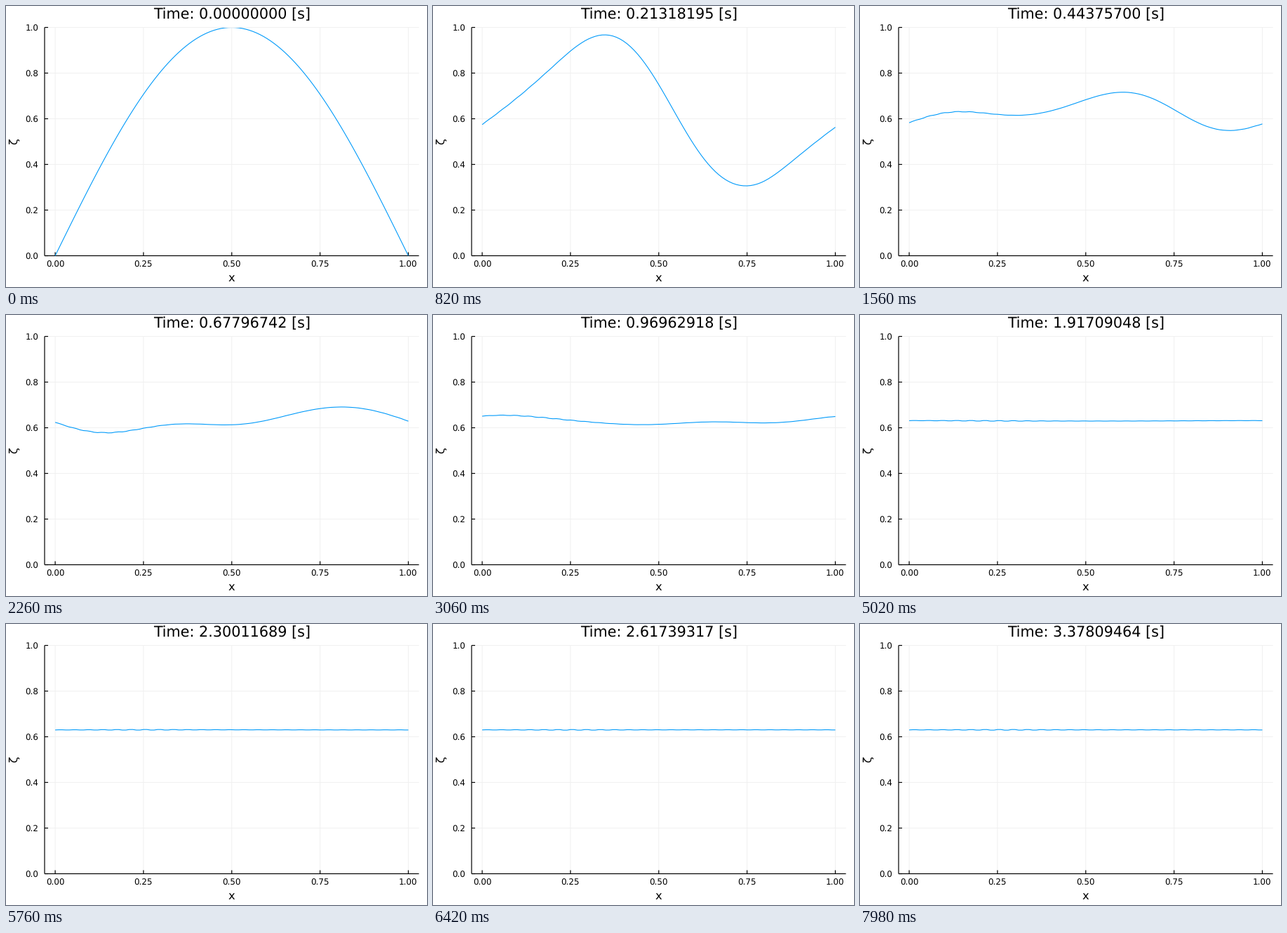
A matplotlib script for the animation above (8000 ms loop, 600 px wide and 400 px high).

```python
import numpy as np
import matplotlib.pyplot as plt
from matplotlib.animation import FuncAnimation
from matplotlib.patches import Rectangle

W, H, DPI = 600, 400, 100
PX = 72 / DPI                                # points per pixel
LEFT, RIGHT, TOP, BOTTOM = 55, 588.5, 30.5, 355.5

plt.rcParams.update({"font.family": "DejaVu Sans", "text.hinting": "none",
                     "text.kerning_factor": 6, "toolbar": "None"})

# Clock: solver steps are unequal, so time is a smooth curve through a few points
STEPS = np.array([0, 34, 65, 89, 124, 137, 171])
TIMES = np.array([0, 0.44375700, 0.96962918, 1.52212253,
                  2.30011689, 2.61739317, 3.37809464])
SLOPES = np.gradient(TIMES, STEPS)


def polar(size, degrees):
    return size * np.exp(1j * np.radians(degrees))


# Periodic grid: a half sine split into right- and left-going damped waves.
# The first modes have their own share, speed and damping rate * t ** power.
N = 101
x = np.linspace(0, 1, N)
modes = np.fft.rfft(np.sin(np.pi * x))
k = np.arange(len(modes))

right = np.full(len(k), 0.1, complex)
right[1:4] = polar(0.708, 150), polar(1, 23), polar(0.09, -17)
right_speed = np.ones(len(k))
right_speed[1:4] = 1, 0.911, 1.19
right_rate = 3.0 + k
right_rate[:4] = 0, 3, 2.47, 0.35
right_power = np.ones(len(k))
right_power[2:4] = 1.53, 4

left = 1 - right
left_speed = np.ones(len(k))
left_speed[1] = 1.11
left_rate = 10.0 + k
left_rate[:3] = 0, 7.4, 10


def px(v):
    return LEFT + (v + 0.03) / 1.06 * (RIGHT - LEFT)


def py(v):
    return BOTTOM - v * (BOTTOM - TOP)


def clock(step):
    i = min(np.searchsorted(STEPS, step, side="right") - 1, len(STEPS) - 2)
    h = STEPS[i + 1] - STEPS[i]
    s = (step - STEPS[i]) / h
    return (TIMES[i] * (1 + 2 * s) * (1 - s) ** 2
            + TIMES[i + 1] * s * s * (3 - 2 * s)
            + h * SLOPES[i] * s * (1 - s) ** 2
            + h * SLOPES[i + 1] * s * s * (s - 1))


def ripple(t):
    """Small standing grid noise, four cells long."""
    centre = 0.05 + 0.25 * (1 - np.exp(-t / 1.5))
    d = (x - centre + 0.5) % 1 - 0.5
    size = 0.0013 * np.exp(-(d / 0.14) ** 2) + 0.0002 * t
    return min(1, t / 0.4) * size * np.cos(50 * np.pi * (x - 0.015))


def surface(t):
    turn = 2j * np.pi * k * t
    z = modes * (right * np.exp(-right_rate * t ** right_power
                                - turn * right_speed)
                 + left * np.exp(-left_rate * t + turn * left_speed))
    return np.fft.irfft(z, N) + ripple(t)


fig = plt.figure(figsize=(W / DPI, H / DPI), dpi=DPI, facecolor="white")
ax = fig.add_axes([0, 0, 1, 1])
ax.set_xlim(0, W)
ax.set_ylim(H, 0)
ax.axis("off")


def stroke(xs, ys, color="black", width=1.2, z=2):
    return ax.plot(xs, ys, color=color, lw=width * PX, zorder=z,
                   solid_capstyle="butt", snap=False)[0]


def label(tx, ty, text, size, **kw):
    return ax.text(tx, ty, text, fontsize=size * PX, **kw)


for v in (0, 0.25, 0.5, 0.75, 1):
    stroke([px(v)] * 2, [TOP, BOTTOM], "#f0f0f0", 1, z=1)
    stroke([px(v)] * 2, [BOTTOM, BOTTOM - 5])
    label(px(v), 372, f"{v:.2f}", 11.9, ha="center", va="baseline")
for v in (0, 0.2, 0.4, 0.6, 0.8, 1):
    stroke([LEFT, RIGHT], [py(v)] * 2, "#f0f0f0", 1, z=1)
    stroke([LEFT, LEFT + 5], [py(v)] * 2)
    label(46.5, py(v) + 5, f"{v:.1f}", 11.9, ha="right", va="baseline")
stroke([LEFT, RIGHT], [BOTTOM, BOTTOM])
stroke([LEFT, LEFT], [TOP, BOTTOM])

label(321.7, 391.5, "x", 16.3, ha="center", va="baseline")
label(11.5, 193, "ζ", 16.3, ha="center", va="center", rotation=90)
title = label(322.1, 18, "", 20.8, ha="center", va="baseline")

curve = stroke(px(x), py(surface(0)), "#009afa", 1.1, z=3)
frame_box = Rectangle((LEFT, TOP), RIGHT - LEFT, BOTTOM - TOP,
                      transform=ax.transData)
curve.set_clip_path(frame_box)


def draw(tick):
    # three steps per 140 ms, held for 20, 100 and 20 ms
    cycle, slot = divmod(tick, 7)
    t = clock(3 * cycle + (slot >= 1) + (slot >= 6))
    curve.set_ydata(py(surface(t)))
    title.set_text(f"Time: {t:.8f} [s]")
    return curve, title


anim = FuncAnimation(fig, draw, frames=400, interval=20, repeat=True,
                     repeat_delay=0, blit=False)
plt.show()
```
